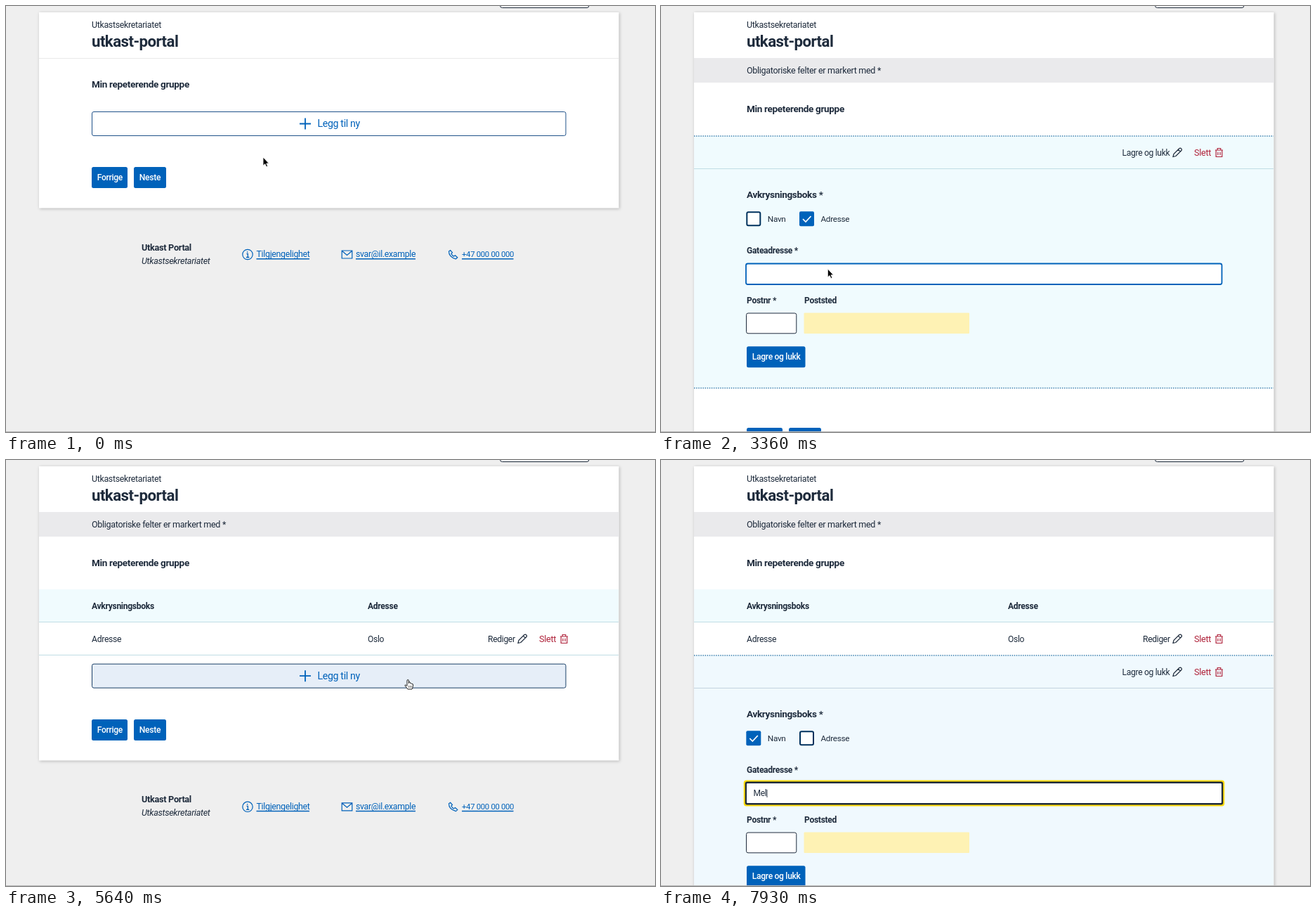
Recreate the animation shown at these times as an HTML page. Size 924x606 px, loop 8000 ms.

```html
<!DOCTYPE html>
<html lang="no">
<head>
<meta charset="utf-8">
<title>Repeterende gruppe</title>
<style>
  html, body { margin: 0; width: 100%; height: 100%; overflow: hidden; background: #efefef; }
  svg { display: block; width: 100vw; height: 100vh; }
  text { font-family: Roboto, Inter, Arial, sans-serif; letter-spacing: -.025em; white-space: pre; }
  .card { filter: drop-shadow(1px 1px 2px rgba(0, 0, 0, .24)); }
</style>
</head>
<body>
<svg viewBox="0 0 924 606"><g id="page"></g><g id="pointer"></g></svg>
<script>
const LOOP = 8000;
const TEXT_SCALE = 1.06; // taller letters, balanced by the tight letter spacing
const BLUE = '#0062ba', NAVY = '#00315d', INK = '#1e2b3c', RED = '#b0243c', PALE = '#f0fbfe';

// Moments at which the page changes
const T = {
  hover1: 600, press1: 1070, form1: 1290, check1: 2930, inputHover1: 3360, focus1: 3570,
  saveHover: 4620, savePress: 4710, list: 4850, hover2: 5430, press2: 5720,
  form2: 5880, check2: 6450, inputHover2: 6700, focus2: 7000
};
const KEYS1 = [3860, 4000, 4140, 4290], KEYS2 = [7350, 7560, 7800];

// Pointer path: time, x, y, shape from that time on
const PATH = [
  [0, 366, 215, 'arrow'], [70, 366, 215, 'arrow'], [680, 461, 163, 'arrow'],
  [1550, 461, 163, 'arrow'], [1930, 619, 247, 'arrow'], [2270, 619, 247, 'arrow'],
  [2850, 206, 302, 'hand'], [3080, 206, 302, 'arrow'], [3420, 240, 380, 'beam'],
  [3860, 240, 380, 'none'], [4450, 240, 380, 'arrow'], [4660, 165, 498, 'hand'],
  [4920, 165, 498, 'arrow'], [5480, 573, 313, 'hand'], [5900, 573, 313, 'arrow'],
  [6360, 132, 395, 'hand'], [6520, 132, 395, 'arrow'], [6740, 183, 465, 'beam'],
  [7210, 183, 465, 'none'], [LOOP, 183, 465, 'none']
];

const SHAPES = {
  none: '',
  arrow: '<path d="M0 0V12.2L2.8 9.7L4.6 13.8L6.6 12.9L4.8 9H8.4Z" fill="#000" stroke="#fff" stroke-width=".9"/>',
  hand: '<path d="M-2 1Q-2-.5-.8-.5Q.4-.5.4 1V4.6Q1-.1 2.8 4.8Q4 3.8 4.6 5.5Q6.5 4.8 6.6 7L6 10.5L5 13H-1L-5 8Q-5.2 5.8-2 8.4Z" fill="#fff" stroke="#222" stroke-width="1"/><path d="M.5 8V11M2.4 8V11M4.2 8V11" stroke="#222" stroke-width=".6"/>',
  beam: '<path d="M-2.5-6Q0-6 0-4.5Q0-6 2.5-6M0-5V5M-2.5 6Q0 6 0 4.5Q0 6 2.5 6M-1.5 1.5H1.5" fill="none" stroke="#111" stroke-width="1"/>'
};

const text = (x, y, s, size = 11.5, fill = INK, weight = 400, more = '') =>
  `<text x="${x}" y="${y}" font-size="${size * TEXT_SCALE}" fill="${fill}" font-weight="${weight}" ${more}>${s}</text>`;
const bold = (x, y, s, size = 11.4) => text(x, y, s, size, INK, 700);
const box = (x, y, w, h, fill, stroke = 'none', sw = 1, r = 2, more = '') =>
  `<rect x="${x}" y="${y}" width="${w}" height="${h}" rx="${r}" fill="${fill}" stroke="${stroke}" stroke-width="${sw}" ${more}/>`;
const path = (d, stroke, sw = 1, more = '') =>
  `<path d="${d}" fill="none" stroke="${stroke}" stroke-width="${sw}" ${more}/>`;
const move = (x, y, s) => `<g transform="translate(${x} ${y})">${s}</g>`;
const dotted = y => path(`M47 ${y}H872`, '#3d80ae', 1.4, 'stroke-dasharray="1.5 1.6"');
const rule = (y, color = '#c0dde4') => path(`M47 ${y}H872`, color);

const button = (x, y, w, label, fill = BLUE) =>
  box(x, y, w, 30, fill, 'none', 1, 2.5) + text(x + 7.8, y + 19, label, 11.4, '#fff', 500);
const navigation = y => button(122, y, 51, 'Forrige') + button(182, y, 46, 'Neste');

const pencil = y => move(735, y, path('M-6 6L-5 2L3-6Q4.5-6.8 6-5.3Q7-4 6-3L-2 5ZM1.5-4.2L4.4-1.3', INK, 1.2));
const trash = y => move(794.5, y, path('M-5.5-3.5H5.5M-4.3-3.5V6H4.3V-3.5M-2.3-3.5V-6H2.3V-3.5M-1.6-.8V3.6M1.6-.8V3.6', RED, 1.2));
const actions = (y, x, label) =>
  text(x, y + 4, label, 11.4) + pencil(y) + text(759, y + 4, 'Slett', 12, RED) + trash(y);

function addButton(y, mode) {
  const ink = mode === 'press' ? NAVY : BLUE;
  const fill = { press: '#b3d0ec', hover: '#e6eef8' }[mode] || '#fff';
  return box(122.5, y + .5, 674.5, 34, fill, mode ? '#1b4068' : '#20528a', 1, 2.5)
    + path(`M418 ${y + 17.5}H434M426 ${y + 9.5}V${y + 25.5}`, ink, 1.8)
    + text(443.5, y + 22, 'Legg til ny', 13.4, ink);
}

function link(x, w, label, size) {
  return text(x, 357, label, size, BLUE) + path(`M${x} 359.7H${x + w}`, BLUE, 1.4);
}

function footer() {
  return bold(193, 347.5, 'Utkast Portal', 12)
    + text(193, 366.5, 'Utkastsekretariatet', 11.9, INK, 400, 'font-style="italic"')
    + move(344, 353.5, `<circle r="7.2" fill="none" stroke="${BLUE}" stroke-width="1.2"/>`
      + path('M-1.5-1H.3V4M-2 4H2.3M-.4-4.3V-2.8', BLUE, 1.3))
    + link(356.5, 75.5, 'Tilgjengelighet', 11.7)
    + move(485.5, 353.5, path('M-7.3-5.5H7.3V5.5H-7.3ZM-7-5L0 1L7-5', BLUE, 1.2))
    + link(498, 85, 'svar@il.example', 11.6)
    + move(636.5, 353.5, path('M-3.8-6L-6-4.5Q-6.2 3.5 4 6.3L6.3 4.3L3 1.2L1 2.6Q-1.5 1.5-2.6-1.2L-1-2.8Z', BLUE, 1.2))
    + link(649, 73.5, '+47 000 00 000', 10.65);
}

function checkbox(x, label, on) {
  return (on
    ? box(x, 292.3, 21, 21, BLUE) + path(`M${x + 5} 303L${x + 9} 307L${x + 16.5} 299`, '#fff', 1.7)
    : box(x + 1, 293.3, 19, 19, '#fff', NAVY, 2))
    + text(x + 30.5, 307, label, 11.1);
}

function input(mode, value, caret) {
  if (mode === 'focus') {
    return box(117.7, 362.5, 684.6, 37, '#ffdd0a', 'none', 1, 4)
      + box(119.7, 364.5, 680.6, 33, INK, 'none', 1, 3)
      + box(122, 367, 676, 28, '#fff', 'none', 1, 1)
      + text(131.5, 384.5, value + (caret ? '<tspan dx="-1">|</tspan>' : ''), 11.4);
  }
  return mode === 'hover'
    ? box(121, 366.5, 677.5, 29.5, '#fff', BLUE, 1.8, 2.5)
    : box(121.5, 366.5, 676.3, 29, '#fff', INK, 1, 2.5);
}

// Form for one entry; y is relative to the first position of the group
function form(o) {
  return box(47, 185, 825, 358.5, o.fill, 'none', 1, 0) + dotted(185) + rule(231.5, o.line)
    + actions(208.5, 656.5, 'Lagre og lukk')
    + bold(122, 273, 'Avkrysningsboks *', 12.8)
    + checkbox(121.3, 'Navn', o.name) + checkbox(197, 'Adresse', o.address)
    + bold(122, 352, 'Gateadresse *') + input(o.mode, o.value, o.caret)
    + bold(122, 422.5, 'Postnr *') + bold(204, 422.5, 'Poststed')
    + box(121.5, 437, 71.3, 28.8, '#fff', INK, 1, 2.5)
    + box(203.5, 436.5, 235.5, 29.5, '#fef2b4', 'none', 1, 1)
    + button(122, 484.3, 83.5, 'Lagre og lukk', o.save) + dotted(543.5) + navigation(600);
}

function table(x) {
  return box(47, 184, 825, 47, PALE, 'none', 1, 0) + rule(230.5)
    + bold(122, 211.5, 'Avkrysningsboks') + bold(x, 211.5, 'Adresse')
    + text(122, 258.5, 'Adresse') + text(x, 258.5, 'Oslo', 11.4)
    + actions(254.5, 686, 'Rediger');
}

function frame(bottom, required) {
  const dy = required ? 34.3 : 0;
  return box(703.5, -20, 126.5, 22.5, '#f5f5f5', INK, 1, 3)
    + box(47, 9, 825.5, bottom - 9, '#fff', 'none', 1, 0, 'class="card"')
    + text(122, 31.3, 'Utkastsekretariatet', 11.7)
    + bold(122, 58, 'utkast-portal', 21)
    + (required
      ? box(47, 74, 825.5, 35, '#eaeaec', 'none', 1, 0) + text(122, 96, 'Obligatoriske felter er markert med *', 11.85)
      : rule(74.5, '#e9e9e9'))
    + bold(122, 116.3 + dy, 'Min repeterende gruppe', 12.8);
}

const typed = (t, keys, word) => word.slice(0, keys.filter(k => t >= k).length);

function caretOn(t, focus, keys) {
  const last = Math.max(focus, ...keys.filter(k => t >= k));
  return (t - last) % 1000 < 500;
}

const addMode = (t, hover, press) => t >= press ? 'press' : t >= hover ? 'hover' : '';
const inputMode = (t, hover, focus) => t >= focus ? 'focus' : t >= hover ? 'hover' : '';

function page(t) {
  if (t < T.form1) {
    return frame(287.5) + addButton(150, addMode(t, T.hover1, T.press1)) + navigation(229) + footer();
  }
  if (t < T.list) {
    return frame(700, true) + form({
      fill: PALE, address: t >= T.check1,
      mode: inputMode(t, T.inputHover1, T.focus1),
      value: typed(t, KEYS1, 'Oslo'), caret: caretOn(t, T.focus1, KEYS1),
      save: t >= T.savePress ? NAVY : t >= T.saveHover ? '#004e95' : BLUE
    });
  }
  if (t < T.form2) {
    return frame(427.5, true) + table(515) + rule(277.5)
      + addButton(289.7, addMode(t, T.hover2, T.press2))
      + navigation(369) + move(0, 139.8, footer());
  }
  return frame(700, true) + table(494) + move(0, 93, form({
    fill: '#f0f9fe', line: '#c3d3de', name: t >= T.check2,
    mode: inputMode(t, T.inputHover2, T.focus2),
    value: typed(t, KEYS2, 'Mel'), caret: caretOn(t, T.focus2, KEYS2)
  }));
}

function pointer(t) {
  const i = PATH.findIndex(p => p[0] > t);
  const [t0, x0, y0, shape] = PATH[i - 1], [t1, x1, y1] = PATH[i];
  const u = (t - t0) / (t1 - t0), e = u * u * (3 - 2 * u);
  return move(x0 + (x1 - x0) * e, y0 + (y1 - y0) * e, SHAPES[shape]);
}

const pageNode = document.getElementById('page'), pointerNode = document.getElementById('pointer');
const bottomLine = path('M0 605.5H924', '#b8b8b8');
let shown = '';

function draw(now) {
  const t = now % LOOP, markup = page(t) + bottomLine;
  if (markup !== shown) pageNode.innerHTML = shown = markup;
  pointerNode.innerHTML = pointer(t);
  requestAnimationFrame(draw);
}
draw(0);
</script>
</body>
</html>
```
